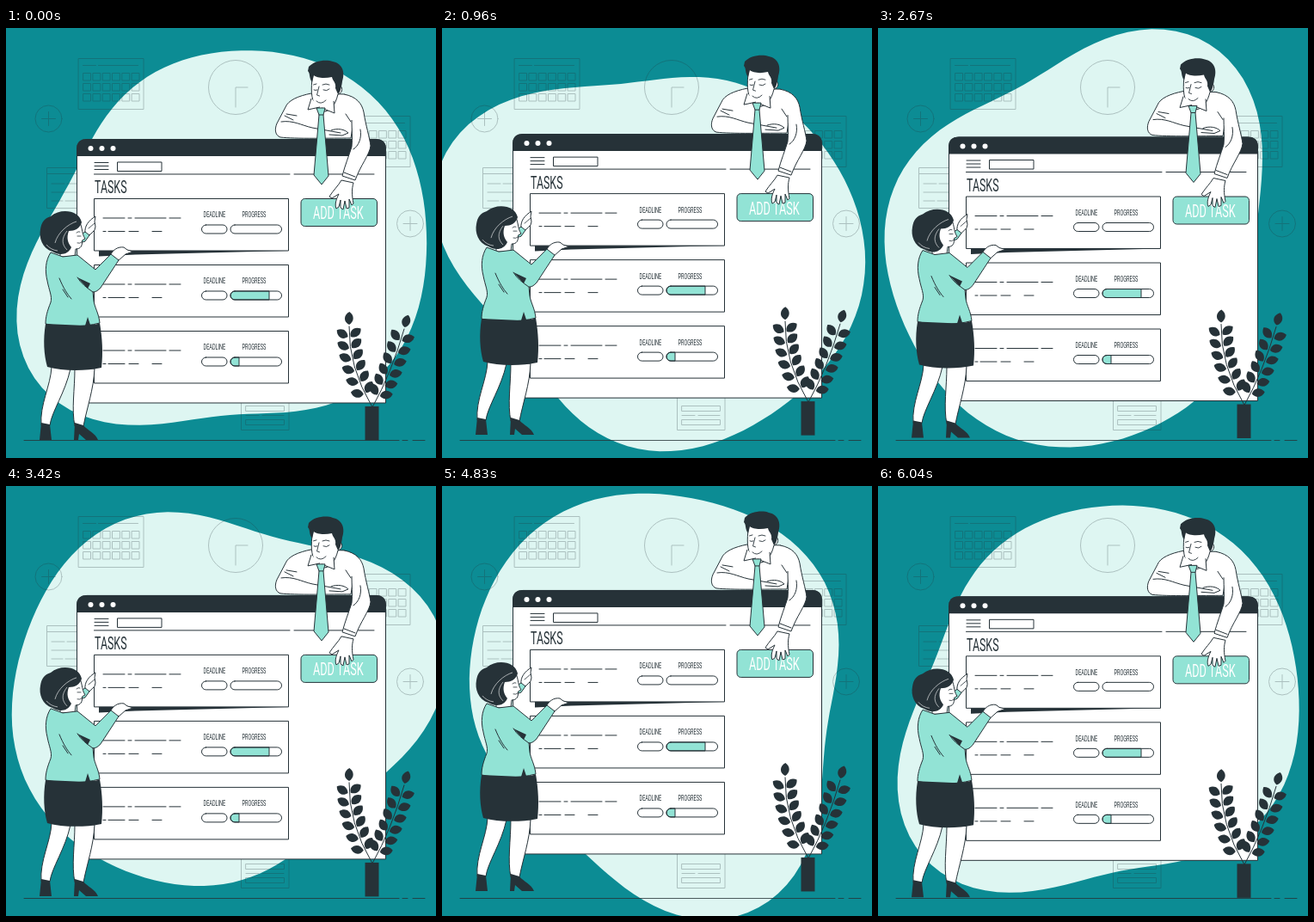
An HTML page that plays this animation: 500 px wide and 500 px high, repeating every 6.08 s.

```html
<!DOCTYPE html>
<html lang="en">
<head>
<meta charset="utf-8">
<title>Task board</title>
<style>
  html, body { margin: 0; height: 100%; overflow: hidden; background: #0c8c94; }
  svg { display: block; width: 100vw; height: 100vh; }
  text { font-family: Roboto, "Open Sans", sans-serif; font-weight: 400; }
  .line { fill: none; stroke: #263238; stroke-linecap: round; stroke-linejoin: round; }
  .white { fill: #fff; stroke: #263238; stroke-linejoin: round; }
  .mint { fill: #92e3d5; stroke: #263238; stroke-linejoin: round; }
  .dark { fill: #263238; }
  .shine { fill: none; stroke: #fff; stroke-width: .6; }
</style>
</head>
<body>
<svg viewBox="0 0 500 500">
  <path id="blob" fill="#def6f2"/>
  <g id="icons" class="line" opacity=".27">
    <circle cx="267" cy="69" r="31.5"/>
    <path d="M281 69H267V92"/>
    <path d="M101 162.500H47.500V209.500H101M47.500 169.500H101M53 181H68M71 181H92M53 191H92M53 201H66M69 201H92"/>
    <path d="M273.500 425V467.500H329V425M279 439.500H323.500V445.500H279ZM279 450.500H294M298 450.500H323M279 455.500H323.500V461.500H279Z"/>
  </g>
  <path class="line" d="M21 479.500H457M461 479.500H467M473 479.500H487" opacity=".8"/>

  <g id="scene">
    <path class="white" d="M82.500 436V141Q82.500 129.500 94 129.500H430Q441.500 129.500 441.500 141V436Z"/>
    <path class="dark" d="M82 149V141Q82 129 94 129H430Q442 129 442 141V149Z"/>
    <g fill="#fff"><circle cx="98.500" cy="140" r="3"/><circle cx="111.500" cy="140" r="3"/><circle cx="124.500" cy="140" r="3"/></g>
    <path class="line" d="M103 156.500H119M103 160.500H119M103 164.500H119M102.500 170H330M335 170H428"/>
    <rect class="white" x="129.500" y="156" width="51.500" height="10.500"/>
    <path class="dark" d="M108 258V265.500L150 263.500L328 259Z"/>
    <g id="cards"></g>
    <rect class="mint" x="343" y="198.500" width="88.500" height="32" rx="4.500"/>
    <g id="titles"></g>

    <g id="plant"><rect class="dark" x="417.500" y="440" width="16" height="39.500"/></g>

    <g id="man">
      <path class="white" d="M355 76C340 79 328 84 325 92L315 111C312 118 313 125 319 127C335 129 380 128 401 128L408 84L393 77Z"/>
      <path class="line" d="M320 109C334 107 343 113 356 116L389 122M324 102L334 107M326 100L338 102M378 119C386 116 394 118 398 122L391 125L376 124"/>
      <path class="white" d="M393 77C408 80 414 88 416 98C418 112 423 128 424 137C423 147 412 160 406 177L391 172C394 160 399 148 402 138C403 128 402 118 402 107"/>
      <path class="line" d="M395 100L401 109M412 118C414 128 410 137 404 141M393 168L406 173"/>
      <path class="white" d="M390 177C386 184 381 188 376 196L379 198L387 193C384 199 382 205 384 210L387 208L389 200L389 209L392 211L394 201L396 210L399 209L399 199L402 206L404 204C402 194 402 187 404 180Z"/>
      <path class="white" d="M357 52C355 65 354 78 358 87C361 94 365 98 371 97C378 96 383 89 386 77C392 76 392 67 387 67L382 54Z"/>
      <path class="white" d="M355 82L351 95L365 92M381 85L382 99L367 93"/>
      <path class="mint" d="M361 93L371 93L369 101L375 172L367 182L358 171L364 101Z"/>
      <path class="line" d="M364 101H369"/>
      <path class="dark" d="M352 45C358 38 372 36 380 39C390 41 395 50 391 62C390 70 388 76 386 77L383 70C384 63 380 62 379 57C370 59 361 58 358 55L356 63C352 58 354 53 351 50Z"/>
      <path class="line" d="M357.500 66L361 65M368 66Q372 64 376 66M358 72Q360 73 362 72M369 72Q373 74 376 71M364 68L361.500 78L364.500 79M361 85Q366 90 372 84" stroke-width=".9"/>
    </g>

    <g id="woman">
      <path class="white" d="M53 394C52 416 39 438 41 462H51C53 446 69 424 75 396ZM80 396C80 420 76 443 80 463H90C94 442 102 420 103 396Z"/>
      <path class="dark" d="M41 459L51 461L53 479H39ZM80 459L90 462C95 468 104 471 107 479H93L85 472L84 479H79Z"/>
      <path class="white" d="M92 239C91 230 96 224 104 219L103 225L104 231L103 235L96 242Z"/>
      <path class="line" d="M96 233L103 227" stroke-width=".8"/>
      <path class="mint" d="M86 241L92 237L97 241L92 248L86 250Z"/>
      <path class="white" d="M83 222C90 230 87 238 92 245L88.500 247C89 253 87 257 81 257L80 266H63V236Z"/>
      <path class="white" d="M121 265C124 258 130 254 137 255L141 258L148 260L139 263L130 271Z"/>
      <path class="mint" d="M52 261C46 270 45 282 48 294C50 305 54 312 52 319C48 329 46 336 46 344C64 348 90 348 109 343C108 332 103 325 102 317L101 307C105 307 107 305 110 302L131 270L122 263L104 281L83 264L66 266Z"/>
      <path class="line" d="M101 307C94 302 87 297 83 290M62 291C67 303 71 309 76 315M66 304L72 313"/>
      <path class="dark" d="M83 290L98 297L95 303ZM46 344C43 362 44 380 48 394C66 399 92 399 111 395C113 378 112 360 109 343C105 345 101 345 98 345L95 336L92 346Z"/>
      <path class="dark" d="M52 219C64 209 85 212 88 226C86 233 80 236 73 236C70 244 72 250 76 255C72 264 62 265 54 260C42 256 38 244 40 234C41 226 45 221 52 219Z"/>
      <path class="shine" d="M82 225C72 228 60 238 57 250M71 236C64 245 65 252 71 258M47 252Q52 258 60 259"/>
      <path class="line" d="M82 238Q84 236 86 237M83 242L87 242M83 250Q86 251 88 249" stroke-width=".8"/>
    </g>
  </g>
</svg>
<script>
const $ = id => document.getElementById(id);
const add = (id, markup) => $(id).insertAdjacentHTML('beforeend', markup);
const RAD = Math.PI / 180;

// One condensed lettering style for every label
const label = (x, y, size, words, color = '#263238') =>
  `<text transform="translate(${x} ${y}) scale(.62 1)" font-size="${size}" fill="${color}">${words}</text>`;
const pill = (x, y, w) => `<rect class="line" x="${x}" y="${y}" width="${w}" height="10" rx="5"/>`;

function card(y, progress) {
  const bar = y + 30.5;
  const fill = progress
    ? `<path class="mint" d="M${progress} ${bar}H266a5 5 0 0 0 0 10H${progress}Z"/>` : '';
  return `<rect class="white" x="102.500" y="${y}" width="226" height="60.500"/>
    <path class="line" d="M113 ${y + 22.5}h25m4 0h4m4 0h36m4 0h13M113 ${y + 38}h3m3 0h19m5 0h11m16 0h11"/>
    ${label(229.5, y + 22, 9, 'DEADLINE')}${label(274.5, y + 22, 9, 'PROGRESS')}
    ${pill(227.5, bar, 29.5)}${fill}${pill(261, bar, 59.5)}`;
}
add('cards', card(198.5, 0) + card(275.5, 306) + card(352.5, 271));
add('titles', label(103, 192.5, 20, 'TASKS') + label(357, 222.5, 20.5, 'ADD TASK', '#fff'));

function calendar(x, y) {
  let d = `M${x} ${y}h75.500v59h-75.500zM${x + 5} ${y + 8}h15m3 0h46`;
  for (let i = 0; i < 18; i++)
    d += `M${x + 5.5 + i % 6 * 11.3} ${y + 17 + (i / 6 | 0) * 12}h8.500v8.500h-8.500z`;
  return `<path d="${d}"/>`;
}
const plus = (x, y) => `<circle cx="${x}" cy="${y}" r="15.500"/><path d="M${x - 8} ${y}h16m-8 -8v16"/>`;
add('icons', calendar(84.5, 35.5) + calendar(394.5, 102.5) + plus(49.5, 105.5) + plus(470, 227.5));

const leaf = (x, y, angle) =>
  `<path class="dark" transform="translate(${x} ${y}) rotate(${angle})" d="M2 0C5 -7 13 -7 17 0C13 6 6 6 2 0Z"/>`;

// A curved stem with leaves in pairs and one at the tip
function stem(bendX, bendY, tipX, tipY) {
  const x0 = 426, y0 = 441;
  let out = `<path class="line" d="M${x0} ${y0}Q${bendX} ${bendY} ${tipX} ${tipY}"/>`;
  const curve = (a, b, c, u) => a * (1 - u) ** 2 + 2 * b * u * (1 - u) + c * u * u;
  const slope = (a, b, c, u) => (b - a) * (1 - u) + (c - b) * u;
  for (let i = 0; i <= 6; i++) {
    const u = .16 + i * .14;
    const x = curve(x0, bendX, tipX, u), y = curve(y0, bendY, tipY, u);
    const along = Math.atan2(slope(y0, bendY, tipY, u), slope(x0, bendX, tipX, u)) / RAD;
    out += i < 6 ? leaf(x, y, along - 55) + leaf(x, y, along + 55) : leaf(tipX, tipY, along);
  }
  return out;
}
add('plant', stem(398, 394, 399, 347) + stem(448, 402, 463, 350));

// The blob is a circle bent by a few waves: [amplitude, phase in degrees]
const waves = [[11, 28], [20.5, -68], [16, 81], [9, 204]];
const outline = Array.from({ length: 120 }, (_, i) => {
  const a = i * 3 * RAD;
  const r = waves.reduce((sum, [amp, phase], k) => sum + amp * Math.cos((k + 1) * a - phase * RAD), 227.5);
  return `${(r * Math.cos(a)).toFixed(1)} ${(r * Math.sin(a)).toFixed(1)}`;
});
$('blob').setAttribute('d', `M${outline.join('L')}Z`);

// The loop restarts just before the turn is complete
const LOOP = 6080, TURN = 6150, FLOAT = TURN / 2, RISE = 9.4;

function draw(now) {
  const t = Math.max(0, now) % LOOP;
  const lift = RISE * (1 - Math.abs(1 - 2 * (t % FLOAT) / FLOAT));
  $('blob').setAttribute('transform', `translate(250 250) rotate(${360 * t / TURN})`);
  $('scene').setAttribute('transform', `translate(0 ${-lift})`);
  requestAnimationFrame(draw);
}
draw(performance.now());
</script>
</body>
</html>
```
